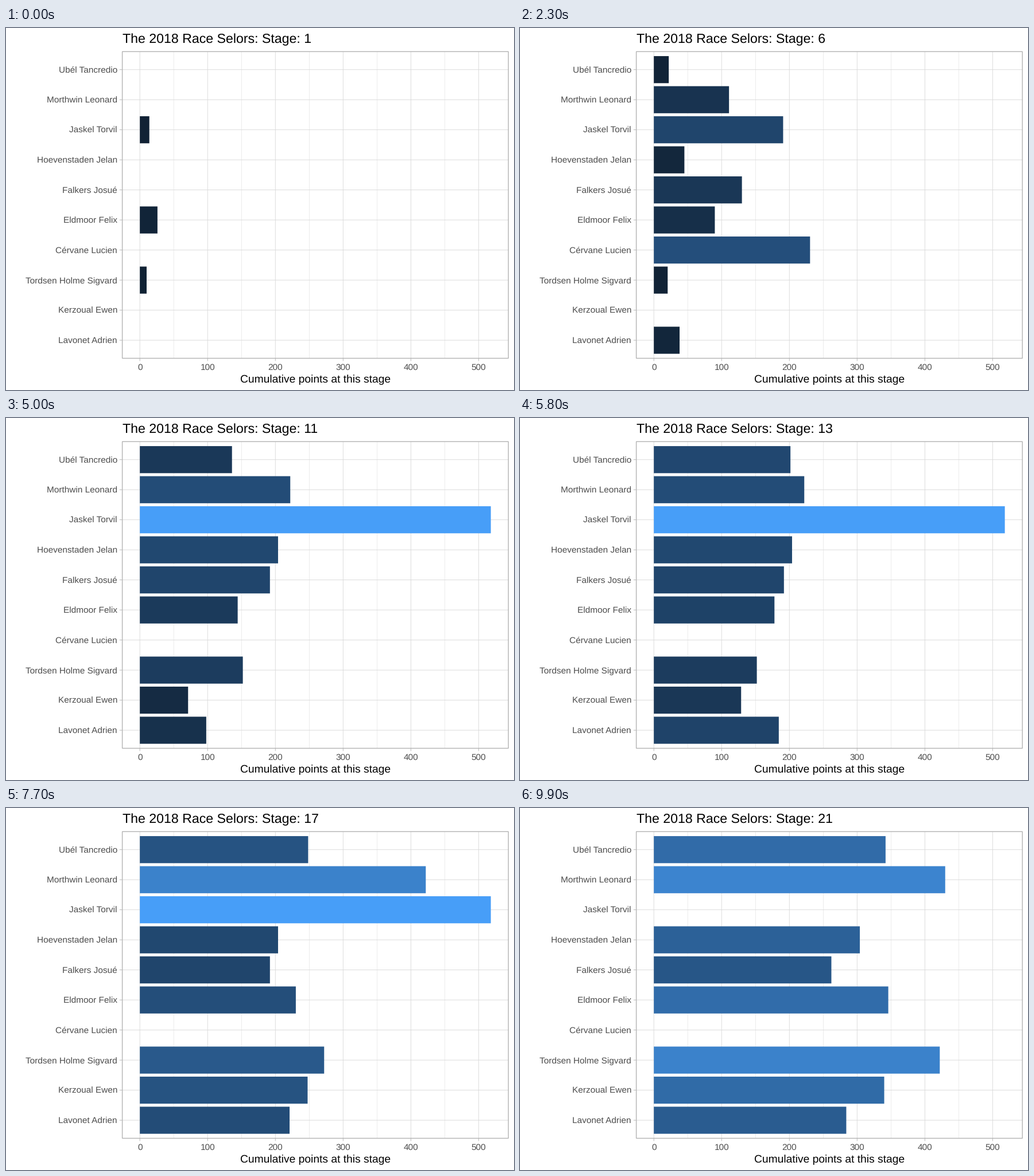
These frames come from a looping animation (885 by 632 pixels, 10000 ms). A matplotlib script:

```python
import matplotlib.pyplot as plt
import numpy as np
from matplotlib.animation import FuncAnimation
from matplotlib.patches import Rectangle

W, H, DPI = 885, 632, 100
FRAMES, INTERVAL, STAGES = 100, 100, 21
LEFT, RIGHT, TOP, BOTTOM = 202.6, 875.2, 41.2, 576.6
MAX_POINTS = 518
BASE = 19.3  # axis title size in pixels
GRID, BORDER, TEXT = "#d9d9d9", "#b3b3b3", "#4d4d4d"
LOW, HIGH = np.array([(16, 33, 51), (71, 158, 248)]) / 255

plt.rcParams.update({
    "font.family": "Liberation Sans",
    "text.hinting": "none",
    "path.snap": False,
})

# Stages on which each kind of rider can score.
SPRINT = [2, 4, 6, 7, 10, 11, 21]
CLASSIC = [3, 4, 6, 7, 10, 11, 14, 16, 19, 21]
CLIMB = [3, 5, 9, 12, 13, 14, 17, 18, 20]

# Totals after these stages; a shorter list keeps its last value.
KEY_STAGES = [1, 6, 9, 12, 15, 18, 21]
RIDERS = {
    "Ubél Tancredio": (CLIMB, [0, 22, 122, 192, 216, 324, 342]),
    "Morthwin Leonard": (CLASSIC, [0, 128, 178, 222, 322, 422, 430]),
    "Jaskel Torvil": (SPRINT, [14, 218, 318, 518]),
    "Hoevenstaden Jelan": (SPRINT, [0, 52, 84, 204, 204, 204, 304]),
    "Falkers Josué": (SPRINT, [0, 150, 164, 192, 192, 192, 262]),
    "Eldmoor Felix": (CLIMB, [26, 90, 140, 162, 202, 296, 346]),
    "Cérvane Lucien": (SPRINT, [0, 266, 274]),
    "Tordsen Holme Sigvard": (CLASSIC, [10, 22, 92, 152, 202, 272, 422]),
    "Kerzoual Ewen": (CLIMB, [0, 0, 70, 76, 208, 340]),
    "Lavonet Adrien": (CLIMB, [0, 38, 78, 178, 194, 284]),
}
LAST_STAGE = {"Jaskel Torvil": 17, "Cérvane Lucien": 9}

ROW = (BOTTOM - TOP) / (len(RIDERS) + 0.2)
SCALE = (RIGHT - LEFT) / (MAX_POINTS * 1.1)
ZERO = LEFT + 0.05 * MAX_POINTS * SCALE

# Each stage is reached on the nearest whole frame; halves go down.
KEY_FRAMES = np.ceil(np.arange(STAGES) * (FRAMES - 1) / (STAGES - 1) - 0.5)


def stage_totals(scoring, totals):
    """Spread the gain between key stages evenly over the scoring stages."""
    def chances(stages):
        return np.searchsorted(scoring, stages, side="right")

    keys = KEY_STAGES[:len(totals)]
    return np.interp(chances(np.arange(1, STAGES + 1)), chances(keys), totals)


TOTALS = {name: stage_totals(*rider) for name, rider in RIDERS.items()}


def x_at(points):
    return ZERO + points * SCALE


def y_at(row):
    return TOP + (row + 0.6) * ROW


def bar_color(points):
    return LOW + (HIGH - LOW) * (points / MAX_POINTS) ** 1.25


fig = plt.figure(figsize=(W / DPI, H / DPI), dpi=DPI, facecolor="white")
ax = fig.add_axes([0, 0, 1, 1])
ax.set_xlim(0, W)
ax.set_ylim(H, 0)
ax.axis("off")


def line(xs, ys, width=0.9, color=GRID):
    ax.plot(xs, ys, color=color, lw=width * 72 / DPI, zorder=1, solid_capstyle="butt")


def label(x, y, text, size, color="black", ha="left"):
    return ax.text(x, y, text, fontsize=size * 72 / DPI, color=color,
                   ha=ha, va="baseline", zorder=5)


def draw_axes():
    for points in range(50, 500, 100):
        line([x_at(points)] * 2, [TOP, BOTTOM], 0.5)
    for points in range(0, 501, 100):
        x = x_at(points)
        line([x, x], [TOP, BOTTOM])
        line([x, x], [BOTTOM, BOTTOM + 4.8], color=BORDER)
        label(x, 596.4, str(points), 0.8 * BASE, TEXT, "center")
    for row, name in enumerate(RIDERS):
        y = y_at(row)
        line([LEFT, RIGHT], [y, y])
        line([LEFT - 4.8, LEFT], [y, y], color=BORDER)
        label(193.9, y + 5.5, name, 0.8 * BASE, TEXT, "right")
    ax.add_patch(Rectangle((LEFT, TOP), RIGHT - LEFT, BOTTOM - TOP, fill=False,
                           ec=BORDER, lw=1.4 * 72 / DPI, zorder=4))
    label((LEFT + RIGHT) / 2, 619, "Cumulative points at this stage", BASE, ha="center")


draw_axes()
title = label(LEFT, 26.5, "", 1.2 * BASE)
bars = {}
for row, name in enumerate(RIDERS):
    bars[name] = ax.add_patch(
        Rectangle((ZERO, y_at(row) - 0.45 * ROW), 0, 0.9 * ROW, lw=0, zorder=3))


def update(frame):
    stage = round(1 + (STAGES - 1) * frame / (FRAMES - 1))
    title.set_text(f"The 2018 Race Selors: Stage: {stage}")
    for name, bar in bars.items():
        points = np.interp(frame, KEY_FRAMES, TOTALS[name])
        last_frame = KEY_FRAMES[LAST_STAGE.get(name, STAGES) - 1]
        bar.set_visible(points > 0 and frame <= last_frame)
        bar.set_width(points * SCALE)
        bar.set_facecolor(bar_color(points))
    return [title, *bars.values()]


anim = FuncAnimation(fig, update, frames=FRAMES, interval=INTERVAL,
                     repeat=True, repeat_delay=0)
plt.show()
```
